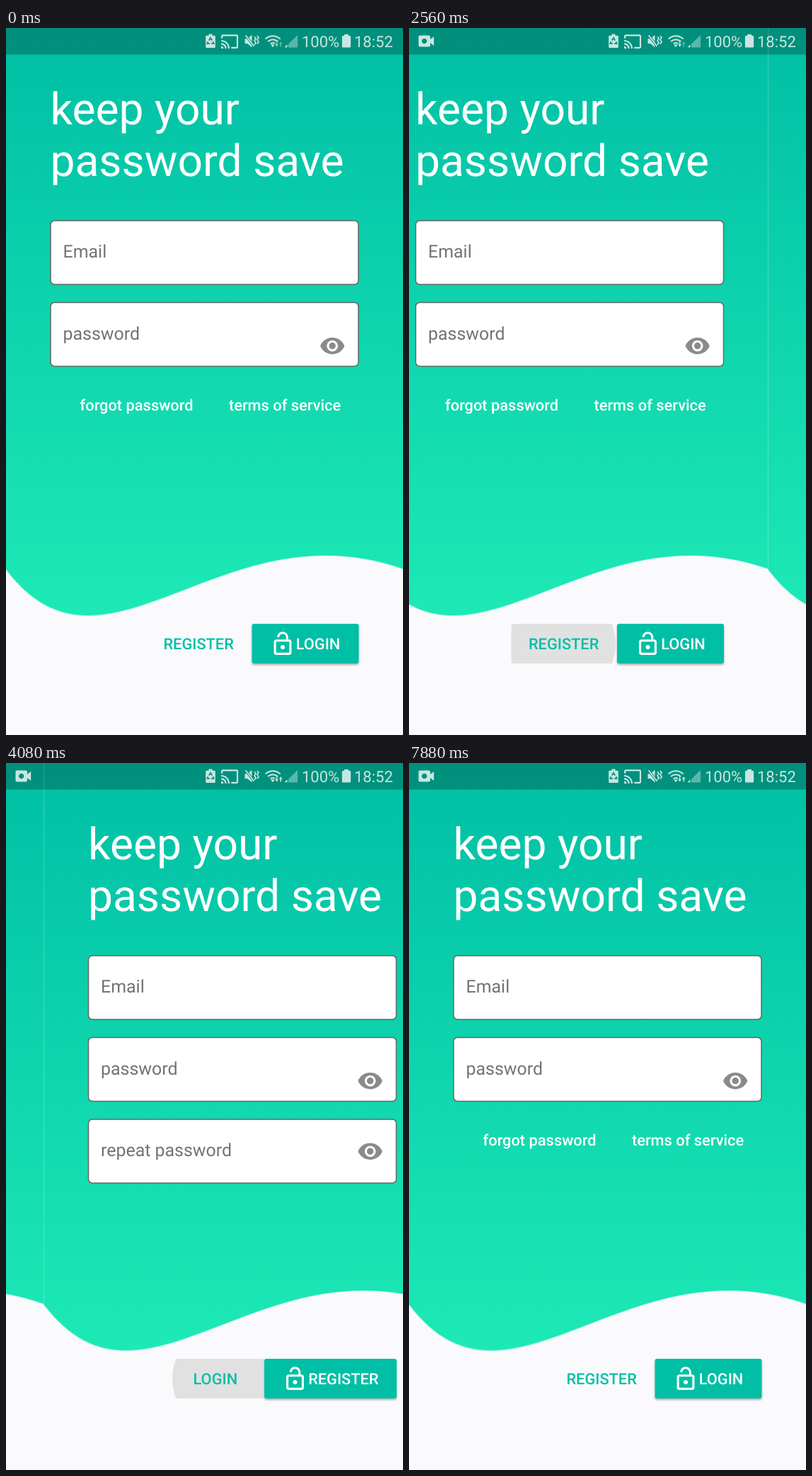
Recreate the animation shown at these times as an HTML page. Size 561 by 998 pixels, loop 8000 ms.

```html
<!DOCTYPE html>
<html lang="en">
<head>
<meta charset="utf-8">
<title>Login pager</title>
<style>
html, body { margin: 0; width: 100%; height: 100%; overflow: hidden; background: #faf9fc; }
svg { display: block; width: 100%; height: 100%; font-family: Roboto, sans-serif; text-rendering: geometricPrecision; }
.title { font-size: 62.3px; fill: #fff; }
.label { font-size: 24.93px; fill: #737373; }
.btn { font-size: 21.8px; font-weight: 500; }
.clock { font-size: 22px; }
</style>
</head>
<body>
<svg viewBox="0 0 561 998" preserveAspectRatio="none">
  <defs>
    <linearGradient id="sea" gradientUnits="userSpaceOnUse" x1="0" y1="0" x2="0" y2="830">
      <stop offset="0" stop-color="#00bfa5"/>
      <stop offset="1" stop-color="#1de9b6"/>
    </linearGradient>
    <filter id="lift" x="-10%" y="-20%" width="120%" height="150%">
      <feDropShadow dx="0" dy="2" stdDeviation="1.6" flood-color="#000" flood-opacity=".32"/>
    </filter>
    <path id="eye" d="M12 4.5C7 4.5 2.73 7.61 1 12c1.73 4.39 6 7.5 11 7.5s9.27-3.11 11-7.5c-1.73-4.39-6-7.5-11-7.5zM12 17c-2.76 0-5-2.24-5-5s2.24-5 5-5 5 2.24 5 5-2.24 5-5 5zm0-8c-1.66 0-3 1.34-3 3s1.34 3 3 3 3-1.34 3-3-1.34-3-3-3z"/>
    <path id="lock" d="M12 17c1.1 0 2-.9 2-2s-.9-2-2-2-2 .9-2 2 .9 2 2 2zm6-9h-1V6c0-2.76-2.24-5-5-5S7 3.24 7 6h1.9c0-1.71 1.39-3.1 3.1-3.1 1.71 0 3.1 1.39 3.1 3.1v2H6c-1.1 0-2 .9-2 2v10c0 1.1.9 2 2 2h12c1.1 0 2-.9 2-2V10c0-1.1-.9-2-2-2zm0 12H6V10h12v10z"/>
    <clipPath id="flatA"><rect x="198" y="841" width="149" height="56" rx="3"/></clipPath>
    <clipPath id="flatB"><rect x="174" y="841" width="137" height="56" rx="3"/></clipPath>
  </defs>
  <rect width="561" height="998" fill="#faf9fc"/>
  <g id="login"></g>
  <g id="register"></g>

  <rect width="561" height="37.5" fill="#000" fill-opacity=".25"/>
  <g fill="#fff" opacity=".78">
    <g id="cam">
      <path fill-rule="evenodd" d="M15.5 10.5h12.5a2 2 0 0 1 2 2v3.6l5.2-4v13l-5.2-4v3.4a2 2 0 0 1-2 2h-12.5a2 2 0 0 1-2-2v-12a2 2 0 0 1 2-2zM21.7 14.8a3.7 3.7 0 1 0 .01 0z"/>
    </g>
    <path d="M286.5 8.5h5v2.3h3a1.3 1.3 0 0 1 1.3 1.3v14.6a1.3 1.3 0 0 1-1.3 1.3h-11a1.3 1.3 0 0 1-1.3-1.3v-14.6a1.3 1.3 0 0 1 1.3-1.3h3z"/>
    <path d="M286.8 17.5l2.2-3.5 2.2 3.5M292.6 19.3l1 2.6h-3.4M287.8 21.9h-3.4l1-2.6" fill="none" stroke="#008f7c" stroke-width="1.8"/>
    <path transform="translate(303 6) scale(1.09)" d="M21 3H3c-1.1 0-2 .9-2 2v3h2V5h18v14h-7v2h7c1.1 0 2-.9 2-2V5c0-1.1-.9-2-2-2zM1 18v3h3c0-1.66-1.34-3-3-3zm0-4v2c2.76 0 5 2.24 5 5h2c0-3.87-3.13-7-7-7zm0-4v2c4.97 0 9 4.03 9 9h2c0-6.08-4.93-11-11-11z"/>
    <path d="M337.5 15.2h3.8l6.2-5.4v17.6l-6.2-5.4h-3.8z"/>
    <path d="M338 9.5l13 17" stroke="#008f7c" stroke-width="3.4"/>
    <path d="M338.5 10.2l12 15.6M351 12.2l2.2 2.6-2.2 3 2.2 3-2.2 2.8M355 11l2 2.6-2 3 2 3-2 2.8" fill="none" stroke="#fff" stroke-width="1.7"/>
    <path d="M366.5 15.5q10.6-8.4 21.2 0M370 19q7.1-5.6 14.2 0M373.5 22.3q3.6-2.6 6.6-.3" fill="none" stroke="#fff" stroke-width="2"/>
    <path d="M374.3 23.8q2.7-1.6 5.2 0l-2.6 3.4z"/>
    <path id="down" d="M381.8 19.2h1.6v4h1.7l-2.5 3.3-2.5-3.3h1.7z"/>
    <path id="up" d="M387.4 26.5h1.6v-4h1.7l-2.5-3.3-2.5 3.3h1.7z"/>
    <path d="M397.5 23.3v4h-4z"/>
    <path d="M412 10v17.4h-13v-4.6z" opacity=".45"/>
    <path d="M478 9h6v2h1.8a1.3 1.3 0 0 1 1.3 1.3v14a1.3 1.3 0 0 1-1.3 1.3h-9.6a1.3 1.3 0 0 1-1.3-1.3v-14a1.3 1.3 0 0 1 1.3-1.3h1.8z"/>
    <text class="clock" x="418" y="27">100%</text>
    <text class="clock" x="492" y="27">18:52</text>
  </g>
</svg>
<script>
const LOOP = 8000, WIDTH = 561, FIRST_STEP = 53.5, TEAL = '#00bfa5';
const $ = id => document.getElementById(id);

const text = (cls, x, y, str, fill = '') =>
  `<text class="${cls}" x="${x}" y="${y}"${fill && ` fill="${fill}"`}>${str}</text>`;

const icon = (id, x, y, fill) =>
  `<use href="#${id}" transform="translate(${x} ${y}) scale(1.558)" fill="${fill}"/>`;

const field = (y, label, secret) =>
  `<rect x="63" y="${y}" width="435" height="90" rx="5.5" fill="#fff" stroke="#666" stroke-width="1.5"/>` +
  text('label', 80.5, y + 52, label) +
  (secret ? icon('eye', 442.5, y + 142.5 - 116 + 16, '#8a8a8a').replace(/ \d+\.\d+\) scale/, ` ${y + 26.5}) scale`) : '');

const splash = (cx, clip) =>
  `<g class="splash" clip-path="url(#${clip})"><circle cx="${cx}" cy="869" r="78" fill="#e1e1e2"/></g>`;

const raised = (x, label) =>
  `<rect x="${x}" y="841" width="${498.5 - x}" height="56" rx="3" fill="${TEAL}" filter="url(#lift)"/>` +
  icon('lock', x + 24.8, 850.7, '#fff') + text('btn', x + 62.2, 877, label, '#fff');

const page = body =>
  `<path d="M0 0V765C140 949 304 673 561 764V0z" fill="url(#sea)"/>` +
  `<path d="M0 765C140 949 304 673 561 764" fill="none" stroke="#d5f7ee" stroke-opacity=".55" stroke-width="1.4"/>` +
  text('title', 62.5, 135.5, 'keep your') + text('title', 62.5, 208.5, 'password save') +
  field(272, 'Email') + field(387.5, 'password', true) + body;

$('login').innerHTML = page(
  text('btn', 104.5, 540, 'forgot password', '#fff') +
  text('btn', 315, 540, 'terms of service', '#fff') +
  splash(267.5, 'flatA') + text('btn', 222.5, 877, 'REGISTER', TEAL) + raised(347.5, 'LOGIN'));

$('register').innerHTML = page(
  field(503, 'repeat password', true) +
  splash(259.5, 'flatB') + text('btn', 211, 877, 'LOGIN', TEAL) + raised(311.5, 'REGISTER'));

// The pager shows one partial step, then snaps to the next page.
function scrollAt(t) {
  if (t < 2560) return 0;
  if (t < 2600) return FIRST_STEP;
  if (t < 4080) return WIDTH;
  if (t < 4120) return WIDTH - FIRST_STEP;
  return 0;
}

function place(id, x, pressed) {
  const el = $(id);
  el.setAttribute('transform', `translate(${x} 0)`);
  el.setAttribute('visibility', Math.abs(x) < WIDTH ? 'visible' : 'hidden');
  el.querySelector('.splash').setAttribute('display', pressed ? 'inline' : 'none');
}

function draw(t) {
  const scroll = scrollAt(t);
  place('login', -scroll, scroll === FIRST_STEP);
  place('register', WIDTH - scroll, scroll === WIDTH - FIRST_STEP);
  $('cam').setAttribute('opacity', Math.min(1, Math.max(0, (t - 80) / 320)));
  $('down').setAttribute('opacity', t < 2240 ? .7 : 1);
  $('up').setAttribute('opacity', t < 3240 ? .45 : 1);
}

let start;
function tick(now) {
  start ??= now;
  draw((now - start) % LOOP);
  requestAnimationFrame(tick);
}
draw(0);
requestAnimationFrame(tick);
</script>
</body>
</html>
```
